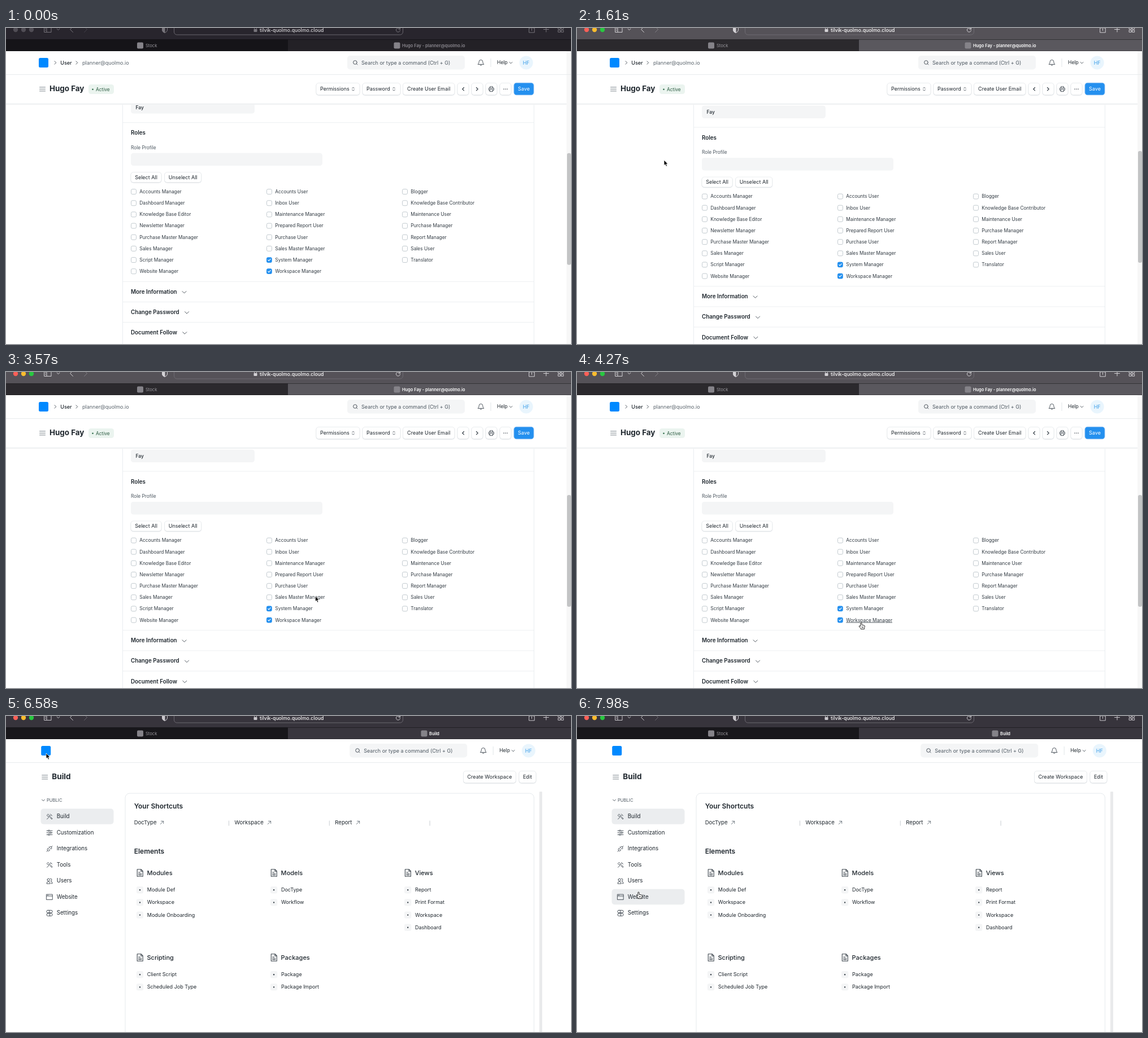
Write an HTML page that moves like this. It is 1000 px wide and 560 px high and loops after 8 s.

```html
<!DOCTYPE html>
<html lang="en">
<head>
<meta charset="utf-8">
<title>User roles</title>
<style>
html, body { margin: 0; width: 100%; height: 100%; overflow: hidden; background: #fff; }
svg { display: block; width: 1000px; height: 560px; --bar: #555258; --tab: #5a585e; --dim: #2b292d; --ink: #fff; --ico: #d3d1d5; }
svg.build { --bar: #37343c; --tab: #39363e; --dim: #18171b; --ico: #c9c7cc; }
svg.idle { --bar: #28252d; --tab: #232126; --dim: #151418; --ink: #8b888f; --ico: #77747b; }
svg.idle .light { fill: #504d55; }
text { font-family: Inter, Arial, sans-serif; fill: #1f272e; white-space: pre; }
.url { fill: #fff; }
svg.idle .url { fill: #d8d7da; }
.i { fill: none; stroke: #3c454d; stroke-width: .9; stroke-linecap: round; stroke-linejoin: round; }
.c { fill: none; stroke: var(--ico); stroke-width: 1; stroke-linecap: round; stroke-linejoin: round; }
</style>
</head>
<body>
<svg id="stage" viewBox="0 0 1000 560"></svg>
<script>
const stage = document.getElementById('stage');
const $ = id => document.getElementById(id);

const text = (x, y, s, size = 9.03, opt = '') =>
  `<text x="${x}" y="${y + size * .36}" font-size="${size}" ${opt}>${s}</text>`;
const rect = (x, y, w, h, fill, r = 0, opt = '') =>
  `<rect x="${x}" y="${y}" width="${w}" height="${h}" rx="${r}" fill="${fill}" ${opt}/>`;
const icon = (x, y, d, opt = '', cls = 'i') =>
  `<path class="${cls}" transform="translate(${x} ${y})" d="${d}" ${opt}/>`;
const group = (id, body) => `<g id="${id}">${body}</g>`;
const hline = (x, y, w, color = '#edf0f2') => rect(x, y, w, 1, color);
const bold = 'font-weight="600"', medium = 'font-weight="500"', mid = 'text-anchor="middle"';

const DOWN = 'M-2.4-1.2L0 1.2 2.4-1.2', RIGHT = 'M-1.5-2.7L1.2 0-1.5 2.7', LEFT = 'M1.5-2.7L-1.2 0 1.5 2.7';
const WIDE = 'M-3.5-1.6L0 1.9 3.5-1.6', SORT = 'M-1.8-1.2L0-3 1.8-1.2M-1.8 1.2L0 3 1.8 1.2';
const BURGER = 'M-5-3.4H5M-5 0H5M-5 3.4H5';
const DOC = 'M-5-6.3H1.8L5-3V6.3H-5ZM1.6-6V-2.8H5M-2.6-1H0M-2.6 1.3H2.6M-2.6 3.6H2.6';

const button = (x, y, w, h, label = '') =>
  rect(x - .5, y, w + 1, h + 1.2, '#dfe3e6', 5) + rect(x, y, w, h, '#fff', 4.5, 'stroke="#e6e9eb" stroke-width=".7"') +
  text(x + w / 2, y + h / 2, label, 9.03, mid);

// Browser window
function chrome() {
  const lights = ['#ff5f57', '#febc2e', '#28c840']
    .map((c, i) => `<circle class="light" cx="${17 + 14 * i}" cy="3" r="4.2" fill="${c}"/>`).join('');
  const fav = id => rect(0, 25.5, 11, 11, '#858389', 2, `id="${id}"`);
  return rect(0, 0, 1000, 41, 'var(--bar)') +
    rect(297.5, -8, 405, 20, 'var(--bar)', 5, 'stroke="#716e75" stroke-width=".9"') + lights +
    icon(74, 3, 'M-6-6H6V4.5H-6ZM-2-6V4.5M-4.5-2H-3.5M-4.5 1H-3.5', '', 'c') +
    icon(92.5, 2.5, DOWN, '', 'c') +
    icon(116, 2.5, 'M2.5-5L-2.5 0 2.5 5', '', 'c') +
    icon(141, 2.5, 'M-2.5-5L2.5 0-2.5 5', 'opacity=".35"', 'c') +
    icon(281, 3, 'M0-6L4.5-4V1Q4 4 0 5.6-4 4-4.5 1V-4Z', '', 'c') +
    icon(281, 3, 'M0-6V5.6Q-4 4-4.5 1V-4Z', 'style="fill:var(--ico)"', 'c') +
    rect(438.5, 2, 6, 5, 'var(--ico)', 1) + icon(441.5, 2, 'M-1.8 0V-2A1.8 1.8 0 0 1 1.8-2V0', '', 'c') +
    text(449, 3.5, 'tilvik-quolmo.quolmo.cloud', 8.7, `${medium} class="url"`) +
    icon(694, 3, 'M3.3-1A3.6 3.6 0 1 0 3.6 1.2M3.7-4V-1H.8', '', 'c') +
    icon(930.5, 3, 'M-2-3H-4.8V5H4.8V-3H2M0 1.5V-6', '', 'c') +
    icon(956, 2.5, 'M-4.5 0H4.5M0-4.5V4.5', '', 'c') +
    icon(982, 2.5, 'M-4.5-4H-.8V-.5H-4.5ZM1-4H4.7V-.5H1ZM-4.5 1.3H-.8V4.8H-4.5ZM1 1.3H4.7V4.8H1Z', '', 'c') +
    rect(0, 20.5, 499, 20.5, 'var(--dim)') + rect(499, 20.5, 501, 20.5, 'var(--tab)') +
    hline(0, 20, 1000, '#0006') + hline(0, 40, 1000, '#0004') +
    fav('fav1') + text(247, 31, 'Stock', 7.6, 'style="fill:#98969c"') +
    fav('fav2') + text(0, 31, '', 7.45, `${bold} id="tabName" style="fill:var(--ink)"`);
}

// Navigation bar shared by both pages
const nav = () =>
  rect(58, 53, 17, 17, '#0089ff', 2.5) +
  rect(604, 49, 208, 24.5, '#f4f5f6', 5) +
  icon(618, 61, 'M2.4 2.4L4 4M3.2 0A3.3 3.3 0 1 1-3.4 0 3.3 3.3 0 1 1 3.2 0') +
  text(629, 61.5, 'Search or type a command (Ctrl + G)', 9.03, 'style="fill:#4c5760"') +
  icon(840.5, 61, 'M-5 3.2Q-3.3 1.8-3.3-1.2A3.3 3.3 0 0 1 3.3-1.2Q3.3 1.8 5 3.2ZM-1.4 5Q0 6 1.4 5') +
  rect(857.5, 54, 1, 15, '#e2e6e9') + text(869, 61.2, 'Help', 8.6) + icon(893.5, 61.7, DOWN) +
  `<circle cx="920.7" cy="61.5" r="12" fill="#e9f5fd"/>` +
  text(920.7, 61.5, 'HF', 9.03, `${mid} style="fill:#3f9fe8"`) +
  icon(64.5, 108.3, BURGER, 'style="stroke:#6b757d"');

// User form
const roles = ['Accounts Manager', 'Accounts User', 'Blogger', 'Dashboard Manager', 'Inbox User',
  'Knowledge Base Contributor', 'Knowledge Base Editor', 'Maintenance Manager', 'Maintenance User',
  'Newsletter Manager', 'Prepared Report User', 'Purchase Manager', 'Purchase Master Manager',
  'Purchase User', 'Report Manager', 'Sales Manager', 'Sales Master Manager', 'Sales User',
  'Script Manager', 'System Manager', 'Translator', 'Website Manager', 'Workspace Manager'];

function role(name, i) {
  const x = 221 + 240 * (i % 3), y = 298.4 + 20.16 * Math.floor(i / 3);
  const on = /^(System|Workspace)/.test(name);
  const box = on
    ? rect(x, y - 4.8, 9.8, 9.8, '#2490ef', 3) + icon(x + 4.9, y, 'M-2.2.1L-.7 1.7 2.3-1.6', 'style="stroke:#fff;stroke-width:1.1"')
    : rect(x + .5, y - 4.4, 9, 9, '#fff', 2.3, 'stroke="#bcc4ca" stroke-width=".9"');
  return box + text(x + 15.3, y, name, 8.33, `style="fill:#333c44" ${i === 22 ? 'id="hot"' : ''}`);
}

const heading = (name, y) => hline(207, y - 18.5, 727) + text(221, y, name, 9.8, bold);
const section = (name, y, chevX) => heading(name, y) + icon(chevX, y + .8, WIDE);

const form = () =>
  rect(221, 137.5, 219, 22.5, '#f4f5f6', 4.5) + text(229.5, 149, 'Fay', 8.5, medium) +
  heading('Roles', 194) +
  text(221, 220, 'Role Profile', 8.33, 'style="fill:#4c5760"') + rect(221, 230, 339, 22.5, '#f4f5f6', 4.5) +
  button(221, 264, 54, 18, 'Select All') + button(280.7, 264, 65, 18, 'Unselect All') +
  roles.map(role).join('') +
  section('More Information', 475.7, 315.5) + section('Change Password', 511.9, 320) +
  section('Document Follow', 548, 316.3);

const userHead = () =>
  rect(0, 41, 1000, 93, '#fff') + hline(0, 134, 992, '#e6e9ec') + hline(0, 135, 992, '#f5f6f7') +
  icon(87.5, 61.5, RIGHT) + text(96.3, 61.3, 'User', 9.03, medium) + icon(125.5, 61.5, RIGHT) +
  text(135, 61.3, 'planner@quolmo.io', 9.03, 'style="fill:#5a646c"') +
  text(77, 107.5, 'Hugo Fay', 13.4, 'font-weight="700"') +
  rect(146, 100, 45, 17, '#ebf4ef', 4.5) + `<circle cx="153.5" cy="108.7" r="1.3" fill="#2c6b47"/>` +
  text(159, 108.7, 'Active', 8.33, 'style="fill:#2c5c42"') +
  button(549, 97.5, 77, 21) + text(556, 108, 'Permissions') + icon(614.5, 108.2, SORT) +
  button(631, 97.5, 67, 21) + text(638, 108, 'Password') + icon(686.5, 108.2, SORT) +
  button(702.5, 97.5, 91.5, 21, 'Create User Email') +
  [799, 824, 849, 874].map(x => button(x, 97.5, 20, 21)).join('') +
  icon(809, 108.2, LEFT, 'style="stroke-width:1.3"') + icon(834, 108.2, RIGHT, 'style="stroke-width:1.3"') +
  icon(859, 108.2, 'M-2.5-1.7V-4.4H2.5V-1.7M-2.5 2H-4.4V-1.7H4.4V2H2.5M-2.5.7H2.5V4.4H-2.5Z') +
  icon(884, 108.2, 'M-3 0h.1M0 0h.1M3 0h.1', 'style="stroke-width:1.5"') +
  rect(899, 97.3, 35, 21.4, '#2490ef', 4.5, 'stroke="#7db9f3" stroke-width=".9"') +
  text(916.5, 108, 'Save', 9.03, `${mid} style="fill:#fff"`);

const userPage = () =>
  rect(206, 135, 1, 425, '#e9edf0') + rect(934, 135, 1, 425, '#e9edf0') +
  group('form', form()) + userHead() +
  rect(992, 41, 8, 519, '#f7f7f7') + rect(993, 218, 7, 198, '#c3c4c5', 3, 'id="thumb"');

// Workspace page
const TOOLS = 'M-4.5 4.5L2.5-2.5M1.5-4.5L4.5-1.5M-4.5-2.5L-2.5-4.5 0-2-2 0ZM1 1.5L4 4.7 5 3.5 2 .5';
const menu = [
  ['Build', TOOLS],
  ['Customization', 'M-5-3.5H-2.5M.5-3.5H5M-5 0H.5M3.5 0H5M-5 3.5H-2.5M.5 3.5H5M-2.5-3.5a1.5 1.2 0 1 0 3 0 1.5 1.2 0 1 0-3 0M.5 0a1.5 1.2 0 1 0 3 0 1.5 1.2 0 1 0-3 0M-2.5 3.5a1.5 1.2 0 1 0 3 0 1.5 1.2 0 1 0-3 0'],
  ['Integrations', 'M-5 5L-3.5 3.5M-2.7-.7L.7 2.7Q-1.5 5-3.4 3.4-5 1.5-2.7-.7ZM-.7-2.7L2.7.7Q5-1.5 3.4-3.4 1.5-5-.7-2.7ZM3.5-3.5L5-5'],
  ['Tools', TOOLS],
  ['Users', 'M-5 4.5Q-5 1-1.8 1 1.2 1 1.2 4.5ZM-4-2a2.2 2.2 0 1 0 4.4 0 2.2 2.2 0 1 0-4.4 0M1.5-4.2A2.2 2.2 0 0 1 2 .2Q5 1 5 4.5H3'],
  ['Website', 'M-5.2-4.7H5.2V4.7H-5.2ZM-5.2-1.8H5.2M-3.5-3.2H-2.5'],
  ['Settings', 'M-3-5H3A2.2 2.2 0 0 1 3-.6H-3A2.2 2.2 0 0 1-3-5ZM-3 .6H3A2.2 2.2 0 0 1 3 5H-3A2.2 2.2 0 0 1-3 .6ZM-.5-5V-.6M.5 .6V5']
];
const menuRow = ([name, d], i) => {
  const y = 178 + 28.5 * i;
  return rect(61.5, y - 13.7, 129, 27.4, '#ebedef', 5, `id="row${i}"`) + icon(77, y + .3, d) + text(89.7, y, name, 9.72);
};

const card = (col, y, title, items) => {
  const x = 230 + 237.1 * col;
  return icon(x + 7.2, y, DOC, 'style="stroke-width:1.1"') + text(x + 19.5, y, title, 11, medium) +
    items.map((s, i) => {
      const v = y + 30 + 22.2 * i;
      return rect(x + .8, v - 6, 12.4, 12.4, '#f4f5f6', 3) +
        `<circle cx="${x + 7}" cy="${v + .2}" r="1.2" fill="#3a434b"/>` + text(x + 19.8, v, s);
    }).join('');
};

const buildPage = () =>
  text(81.3, 107.5, 'Build', 13.5, 'font-weight="700"') +
  button(809.5, 97.5, 93, 21, 'Create Workspace') + button(908, 97.5, 30, 21, 'Edit') +
  icon(66, 149.3, DOWN) + text(72, 148.8, 'PUBLIC', 7.64, 'style="fill:#4c5760"') +
  menu.map(menuRow).join('') +
  rect(211, 137, 723.5, 440, '#fff', 8, 'stroke="#e6eaed"') + rect(944, 134, 5, 426, '#e9eaeb', 1) +
  text(226.7, 160, 'Your Shortcuts', 12, bold) + text(226.7, 239.5, 'Elements', 12, bold) +
  [['DocType', 276], ['Workspace', 466], ['Report', 623]].map(([s, ax], i) =>
    text(226.7 + 177.8 * i, 189, s, 9.6) +
    icon(ax, 189, 'M-2.7 2.7L2.7-2.7M-1.5-2.7H2.7V1.5', 'style="stroke:#68727a"') +
    rect(394 + 177.8 * i, 185.5, 1, 9, '#c9ced2')).join('') +
  card(0, 278, 'Modules', ['Module Def', 'Workspace', 'Module Onboarding']) +
  card(1, 278, 'Models', ['DocType', 'Workflow']) +
  card(2, 278, 'Views', ['Report', 'Print Format', 'Workspace', 'Dashboard']) +
  card(0, 428, 'Scripting', ['Client Script', 'Scheduled Job Type']) +
  card(1, 428, 'Packages', ['Package', 'Package Import']);

const cursor =
  '<path id="arrow" d="M0 0V9.6L2.2 7.6 3.7 11.2 5.5 10.4 4 7H6.9Z" fill="#000" stroke="#fff" stroke-width=".8"/>' +
  '<path id="hand" d="M-1.2 1Q-1.2 0-.1 0 1 0 1 1V4.2L5 5Q6.6 5.4 6.4 7L5.5 9.3V11.6H-.7V10.4L-3.6 7.2Q-4 5.6-2.6 5.8L-1.2 6.9ZM1.5 7.2V9.5M3.2 7.2V9.5" fill="#fff" stroke="#111" stroke-width=".9" stroke-linejoin="round"/>';

stage.innerHTML = rect(0, 0, 1000, 560, '#fff') + group('user', userPage()) + group('build', buildPage()) +
  hline(0, 82, 1000, '#e8ebed') + group('nav', nav()) + chrome() + group('cursor', cursor);
$('fav1').setAttribute('x', 232);

// Pointer stops: time, x, y
const stops = [[0, 620, 570], [840, 368, 361], [980, 260, 253], [1190, 260, 253], [1400, 154, 234],
  [1750, 154, 234], [2590, 93, 117], [2800, 110, 113], [3360, 556, 394], [3500, 556, 394],
  [3850, 473, 424], [4270, 503, 444], [4690, 499, 445], [4760, 499, 445], [5110, 272, 149],
  [5320, 272, 149], [5670, 92, 86], [6020, 71, 66], [7280, 71, 66], [7980, 109, 312], [8000, 109, 312]];

function pointer(t) {
  const i = stops.findIndex(s => s[0] > t);
  const [t0, x0, y0] = stops[i - 1], [t1, x1, y1] = stops[i];
  const p = (t - t0) / (t1 - t0), e = p * p * (3 - 2 * p);
  return [x0 + (x1 - x0) * e, y0 + (y1 - y0) * e];
}

const show = (id, on) => $(id).style.display = on ? '' : 'none';
const within = (t, a, b) => t >= a && t < b;

function draw(now) {
  const t = Math.floor(now % 8000 / 70) * 70;
  const build = t >= 6510, [x, y] = pointer(t);
  stage.setAttribute('class', t < 1610 ? 'idle' : build ? 'build' : '');
  show('user', !build);
  show('build', build);
  $('nav').setAttribute('transform', `translate(${build ? 4.2 : 0} 0)`);
  $('fav2').setAttribute('x', build ? 734.5 : 686.5);
  $('tabName').setAttribute('x', build ? 749 : 701);
  $('tabName').textContent = build ? 'Build' : 'Hugo Fay - planner@quolmo.io';

  const left = Math.max(0, 1 - t / 840) ** 2;
  $('form').setAttribute('transform', `translate(0 ${-8.4 * left})`);
  $('thumb').setAttribute('y', 218 + 3.7 * left);
  $('hot').setAttribute('text-decoration', within(t, 4060, 4830) ? 'underline' : 'none');

  const row = build ? Math.floor((y - 164.3) / 28.5) : -1;
  menu.forEach((_, i) => show('row' + i, i === 0 || i === row));
  const hand = within(t, 2660, 2870) || within(t, 4060, 4830) || within(t, 5880, 6510) ||
    (t >= 6790 && (y < 72 || row >= 0));
  show('hand', hand);
  show('arrow', !hand);
  show('cursor', t > 0);
  $('cursor').setAttribute('transform', `translate(${x} ${y})`);
}

const start = performance.now();
function loop() {
  draw(performance.now() - start);
  requestAnimationFrame(loop);
}
loop();
</script>
</body>
</html>
```
